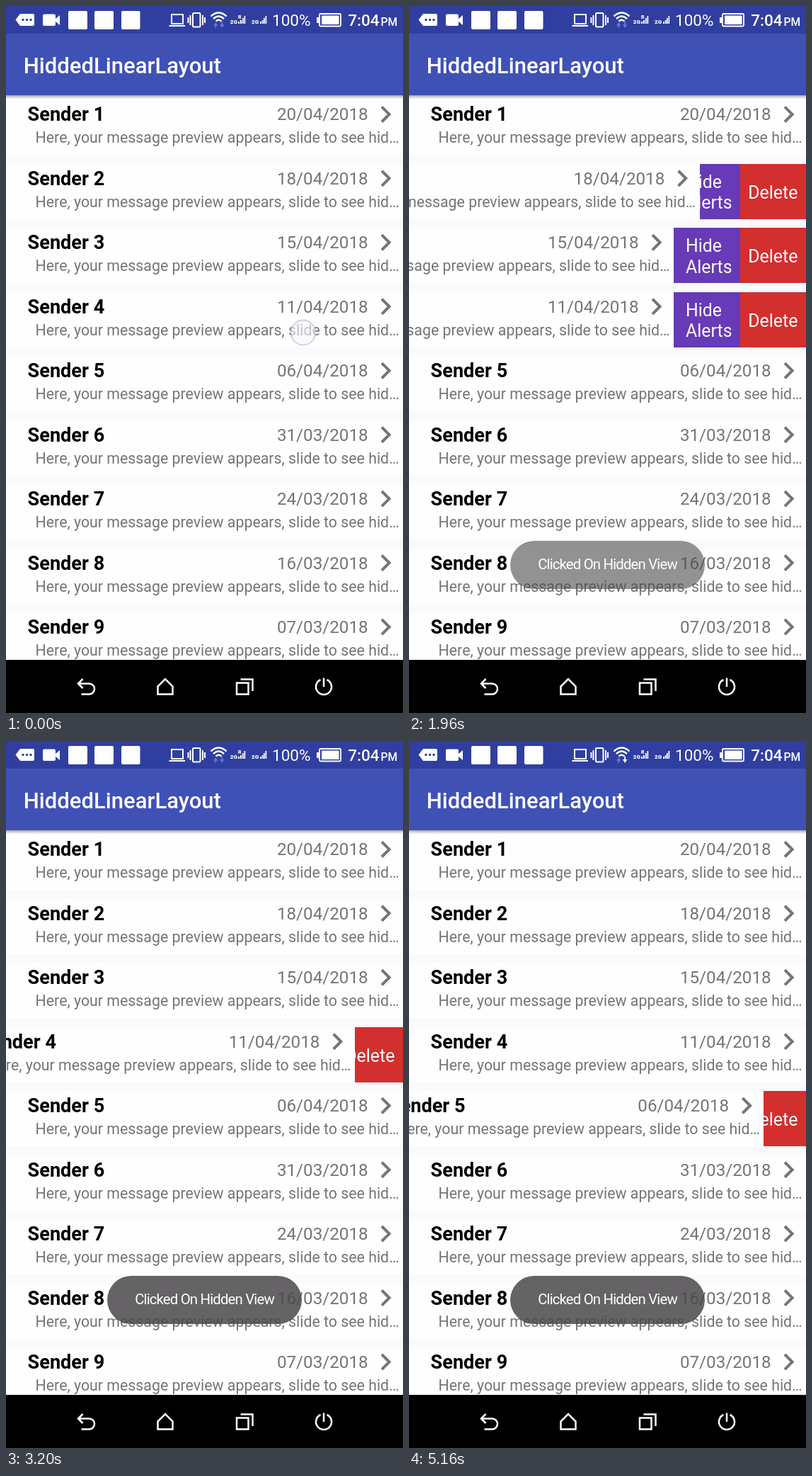
Write an HTML page that moves like this. It is 561 px wide and 998 px high and loops after 5200 ms.

```html
<!DOCTYPE html>
<html lang="en">
<head>
<meta charset="utf-8">
<style>
  html, body { margin: 0; width: 100%; height: 100%; overflow: hidden; background: #faf9fb; }
  svg { display: block; width: 561px; height: 998px; font-family: Roboto, sans-serif; }
  #list rect { shape-rendering: crispEdges; }
  .sender { font-size: 27.1px; font-weight: 700; }
  .date { font-size: 24.2px; fill: #757575; text-anchor: middle; }
  .preview { font-size: 21.33px; fill: #757575; }
  .action { font-size: 24.9px; fill: #fff; }
  .line { fill: none; stroke: #fff; stroke-width: 2.5; }
</style>
</head>
<body>
<svg viewBox="0 0 561 998">
  <defs>
    <linearGradient id="shade" x2="0" y2="1">
      <stop stop-color="#000" stop-opacity=".32"/>
      <stop offset="1" stop-color="#000" stop-opacity="0"/>
    </linearGradient>
  </defs>
  <rect width="561" height="998" fill="#faf9fb"/>
  <g id="list"></g>

  <rect y="126" width="561" height="5" fill="url(#shade)"/>
  <rect y="39" width="561" height="87" fill="#3f51b5"/>
  <text x="24.7" y="94.5" font-size="31.05" font-weight="500" fill="#fff">HiddedLinearLayout</text>

  <g id="status" fill="#fff">
    <rect width="561" height="39" fill="#303f9f"/>
    <path d="M20 11H38a2 2 0 0 1 2 2V26a2 2 0 0 1-2 2H20L13.5 19.5z"/>
    <g fill="#303f9f"><circle cx="24" cy="19.5" r="1.7"/><circle cx="29.5" cy="19.5" r="1.7"/><circle cx="35" cy="19.5" r="1.7"/></g>
    <rect x="52" y="11.5" width="18" height="16.5" rx="2"/>
    <path d="M69 19l7-6v14l-7-6z"/>
    <rect x="88" y="7" width="27" height="26" rx="2"/>
    <rect x="125" y="7" width="27" height="26" rx="2"/>
    <rect x="163" y="7" width="26.5" height="26" rx="2"/>
    <g class="line" style="stroke-width:2">
      <path d="M234 12H250V25H234zM230.5 28H253"/>
      <rect x="264" y="10" width="10.5" height="19.5" rx="1.5"/>
      <path d="M260.5 13V27M257.5 16V24M278 13V27M281 16V24"/>
      <path stroke-width="2.4" d="M289.5 14.5Q300.5 4.5 311.5 14.5M293 18Q300.5 11 308 18M296.5 21.5Q300.5 18 304.5 21.5"/>
    </g>
    <path d="M293 28l3.200-5 3.200 5zM295.300 27h1.800v4h-1.800z" fill="#6575cf"/>
    <path id="download" d="M302 26h6.400l-3.200 5zM304.300 22h1.800v5h-1.800z"/>
    <g font-size="8" font-weight="900">
      <text x="316.8" y="25">2G</text><text x="347" y="25">2G</text>
      <text x="328" y="18" font-size="7">R</text>
    </g>
    <path d="M328 22h2v3h-2zM331 20h2v5h-2zM334 17h1.700v8H334zM336.500 14h1.700v11h-1.700zM359 22h2v3h-2zM361.800 20h1.700v5h-1.700zM364 17h1.700v8H364zM366.500 14h1.700v11h-1.700z"/>
    <text x="376" y="28" font-size="22.5">100%</text>
    <rect class="line" x="443" y="11" width="30" height="17.5" rx="1.5" style="stroke-width:1.8"/>
    <path d="M446 13.500H470.500V26H446zM439 16h3v8h-3z"/>
    <text x="483.3" y="28" font-size="22.5" font-weight="500">7:04</text>
    <text x="529.6" y="28" font-size="15.6" font-weight="500">PM</text>
  </g>

  <g id="toast">
    <rect x="143" y="755" width="275" height="68" rx="34" fill="#4a484b" opacity=".85"/>
    <text x="280.5" y="795" font-size="20.4" letter-spacing="-.85" text-anchor="middle" fill="#fff">Clicked On Hidden View</text>
  </g>
  <circle id="touch" r="17.5" fill="#f7f7fd" fill-opacity=".6" stroke="#aeb0d4" stroke-opacity=".55" stroke-width="2"/>

  <rect y="923" width="561" height="75"/>
  <g class="line">
    <path d="M108.500 950L102 956.500L108.500 963M102 956.500H117.500a7.500 7.500 0 0 1 0 15H106.500"/>
    <path d="M214.500 960.500L225 950L235.500 960.500V971.500H214.500z"/>
    <path d="M326 955.500H342.500V971.500H326zM331.500 950.500H348.500V967"/>
    <path d="M444.500 951a11 11 0 1 0 9 0M449 948.500V961"/>
  </g>
</svg>
<script>
const LOOP = 5200, STEP = 40, OPEN = 187;
const $ = id => document.getElementById(id);
const dates = ['20/04', '18/04', '15/04', '11/04', '06/04', '31/03', '24/03', '16/03', '07/03'];

// Per row: opening start and end, closing start and end
const slides = {
  2: [1000, 1300, 1764, 2764],
  3: [500, 750, 2155, 3130],
  4: [40, 280, 2565, 3565],
  5: [3860, 4200, 4455, 5490]
};

// Start, end, x, y, horizontal travel, strength
const touches = [
  [0, 220, 420, 461, -170, 1],
  [480, 720, 425, 368, -170, 1],
  [960, 1240, 430, 275, -170, 1],
  [1560, 1800, 500, 275, 0, .5],
  [2120, 2360, 495, 371, 0, .5],
  [2520, 2760, 495, 455, 0, .5],
  [3800, 4120, 478, 539, -180, 1],
  [4400, 4680, 456, 544, 0, .5]
];

const actions = row => `
  <g id="actions${row}">
    <rect x="374" width="94" height="78" fill="#673ab7"/>
    <rect x="467.5" width="94" height="78" fill="#d32f2f"/>
    <text class="action" x="391" y="34">Hide</text>
    <text class="action" x="391" y="63.5">Alerts</text>
    <text class="action" x="514.3" y="49" text-anchor="middle">Delete</text>
  </g>`;

$('list').innerHTML = dates.map((date, i) => `
  <g transform="translate(0 ${132.4 + 90.45 * i})">
    ${slides[i + 1] ? actions(i + 1) : ''}
    <g id="row${i + 1}">
      <rect width="561" height="78" fill="#fefefe"/>
      <text class="sender" x="30.6" y="30">Sender ${i + 1}</text>
      <text class="date" x="447.3" y="29">${date}/2018</text>
      <path d="M531 9.900L541.600 20.500L531 31.100" fill="none" stroke="#757575" stroke-width="4"/>
      <text class="preview" x="41.6" y="61">Here, your message preview appears, slide to see hid…</text>
    </g>
  </g>`).join('');

const progress = (t, a, b) => Math.min(1, Math.max(0, (t - a) / (b - a)));

function draw(t) {
  for (const [row, [a, b, c, d]] of Object.entries(slides)) {
    const shift = OPEN * (progress(t, a, b) - progress(t, c, d));
    $('row' + row).setAttribute('transform', `translate(${-shift} 0)`);
    $('actions' + row).setAttribute('visibility', shift > 0 ? 'visible' : 'hidden');
  }
  $('toast').setAttribute('opacity', progress(t, 1780, 2040));
  $('download').setAttribute('fill', t < 3240 ? '#6575cf' : '#fff');

  const active = touches.find(([a, b]) => t >= a && t < b);
  if (active) {
    const [a, b, x, y, travel, strength] = active;
    $('touch').setAttribute('cx', x + travel * progress(t, a, b));
    $('touch').setAttribute('cy', y);
    $('touch').setAttribute('opacity', strength * Math.min(1, (b - t) / 120));
  } else {
    $('touch').setAttribute('opacity', 0);
  }
}

const start = performance.now();
function tick() {
  const t = (performance.now() - start) % LOOP;
  draw(Math.floor(t / STEP) * STEP);
  requestAnimationFrame(tick);
}
tick();
</script>
</body>
</html>
```
